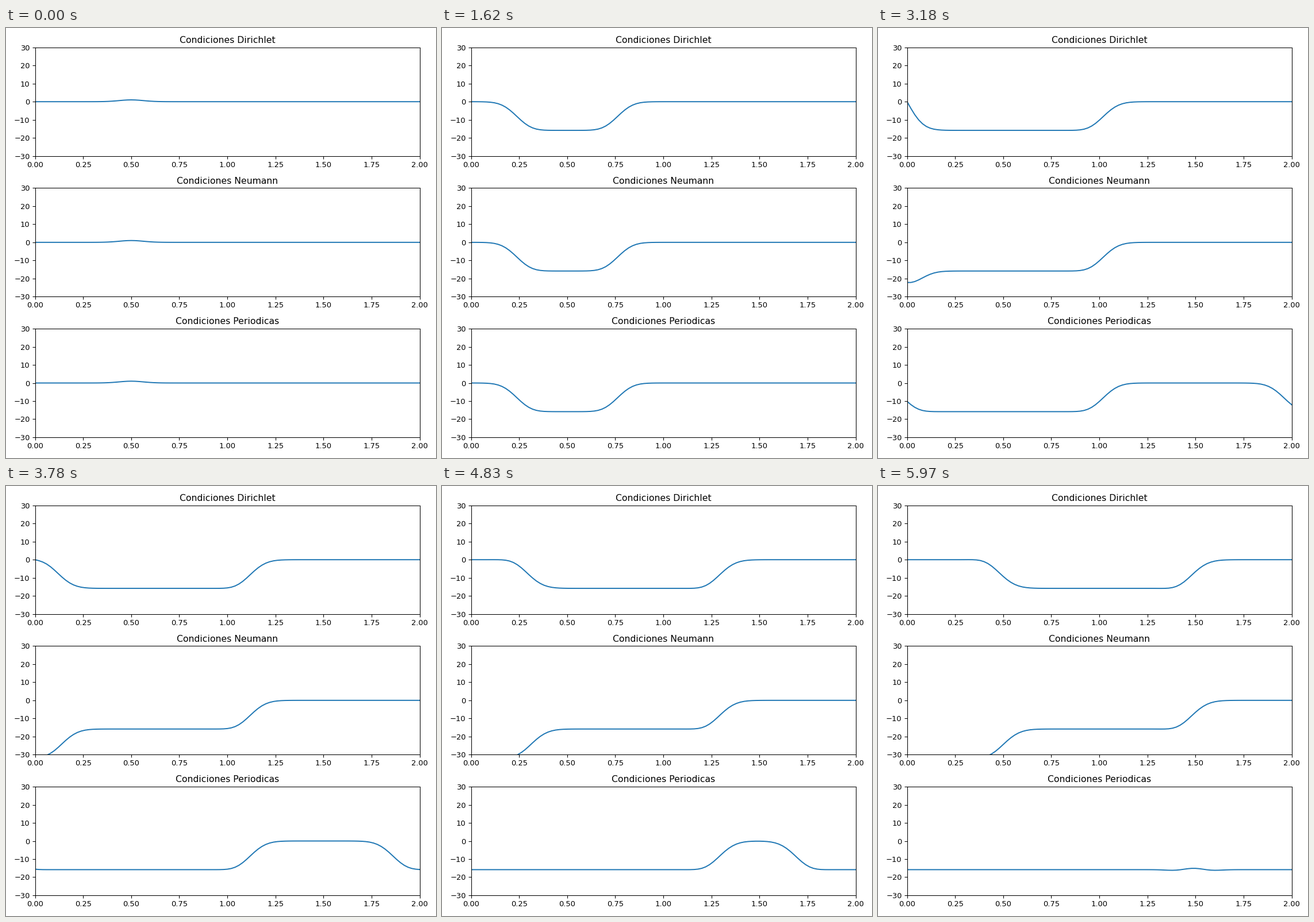
A matplotlib script for the animation above (6000 ms loop, 748x748 px).

```python
import numpy as np
import matplotlib.pyplot as plt
from matplotlib.animation import FuncAnimation

FRAMES = 200
INTERVAL = 30
N = 101
STEP = 0.005  # distance travelled by the wave per frame

x = np.linspace(0, 2, N)
courant2 = (STEP / (x[1] - x[0])) ** 2


def dirichlet(u):
    u[0] = u[-1] = 0


def neumann(u):
    u[0], u[-1] = u[1], u[-2]


def periodic(u):
    u[0], u[-1] = u[-2], u[1]


def solve(boundary):
    """Explicit finite differences for the 1D wave equation."""
    u = np.zeros((FRAMES, N))
    u[0] = np.exp(-125 * (x - 0.5) ** 2)
    for n in range(1, FRAMES - 1):
        lap = u[n, 2:] - 2 * u[n, 1:-1] + u[n, :-2]
        u[n + 1, 1:-1] = 2 * u[n, 1:-1] - u[n - 1, 1:-1] + courant2 * lap
        boundary(u[n + 1])
    return u


cases = [
    ("Condiciones Dirichlet", dirichlet),
    ("Condiciones Neumann", neumann),
    ("Condiciones Periodicas", periodic),
]

fig, axes = plt.subplots(3, 1, figsize=(8, 8), dpi=93.5)
waves, lines = [], []
for ax, (title, boundary) in zip(axes, cases):
    u = solve(boundary)
    line, = ax.plot(x, u[0], color="C0", lw=1.5)
    ax.set(title=title, xlim=(0, 2), ylim=(-30, 30),
           yticks=range(-30, 31, 10))
    waves.append(u)
    lines.append(line)
fig.tight_layout()


def update(i):
    for line, u in zip(lines, waves):
        line.set_ydata(u[i])
    return lines


anim = FuncAnimation(fig, update, frames=FRAMES, interval=INTERVAL,
                     repeat=True, repeat_delay=0, blit=False)
plt.show()
```
